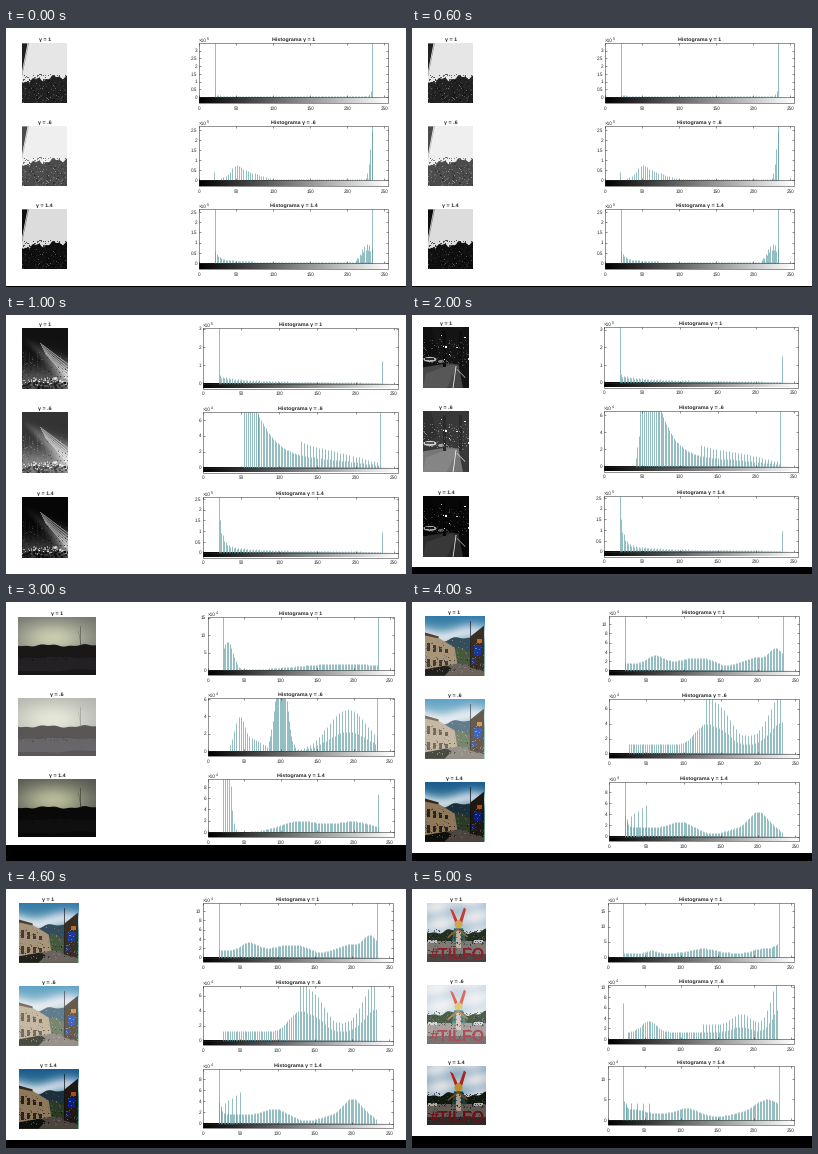
These frames come from a looping animation (400 px wide and 259 px high, 6000 ms). A matplotlib script:

```python
import numpy as np
import matplotlib.pyplot as plt
from matplotlib.animation import FuncAnimation
from matplotlib.collections import LineCollection
from matplotlib.patches import Ellipse, Polygon, Rectangle

W, H, DPI = 400, 259, 100
PX = 72 / DPI
TEAL, INK = "#5c9ca2", "#262626"
GAMMAS = ("1", ".6", "1.4")
DARK, BRIGHT = 21, 234  # bins that collect the clipped tones

plt.rcParams["font.family"] = "Liberation Sans"
plt.rcParams["text.hinting"] = "none"
fig = plt.figure(figsize=(W / DPI, H / DPI), dpi=DPI, facecolor="white")
ax = fig.add_axes([0, 0, 1, 1])


def label(x, y, s, size, ha="center", color=INK, **kw):
    return ax.text(x, y + 0.36 * size, s, fontsize=size * PX, ha=ha,
                   va="baseline", color=color, **kw)


def segments(segs, color, width, **kw):
    ax.add_collection(LineCollection(segs, colors=color, linewidths=width * PX, **kw))


def bump(v, center, height, width):
    return height * np.exp(-((v - center) / width) ** 2)


def tail(v, height, length, start=DARK):
    return height * np.exp((start - v) / length)


class Photo:
    """Flat scene in local pixels, with a gamma curve on every colour."""

    def __init__(self, x, y, w, h, gamma):
        self.x, self.y, self.w, self.h, self.g = x, y, w, h, gamma
        self.frame = Rectangle((x, y), w, h, transform=ax.transData)
        self.rng = np.random.default_rng(7)

    def tone(self, c):
        c = (c,) * 3 if np.isscalar(c) else c
        return tuple(float(v) ** self.g for v in c)

    def add(self, patch):
        ax.add_patch(patch)
        patch.set_clip_path(self.frame)

    def poly(self, c, *pts):
        self.add(Polygon(np.add(pts, (self.x, self.y)), fc=self.tone(c), lw=0))

    def box(self, c, x, y, w, h):
        self.poly(c, (x, y), (x + w, y), (x + w, y + h), (x, y + h))

    def blob(self, c, x, y, w, h, alpha=1):
        self.add(Ellipse((self.x + x, self.y + y), w, h, fc=self.tone(c), lw=0,
                         alpha=alpha))

    def line(self, c, x0, y0, x1, y1, width=1, alpha=1):
        art, = ax.plot([self.x + x0, self.x + x1], [self.y + y0, self.y + y1],
                       color=self.tone(c), lw=width * PX, alpha=alpha)
        art.set_clip_path(self.frame)

    def ridge(self, c, y, amp, waves, slope=0):
        """Fill everything below a wavy outline."""
        x = np.linspace(0, self.w, 60)
        t = 2 * np.pi * waves * x / self.w
        top = y + slope * x + amp * (np.sin(t) + 0.5 * np.sin(2.7 * t + 1))
        self.poly(c, (0, self.h), *zip(x, top), (self.w, self.h))

    def fade(self, fn):
        v, u = np.mgrid[0:1:50j, 0:1:50j]
        rgb = np.clip(np.stack(np.broadcast_arrays(*fn(u, v)), -1), 0, 1) ** self.g
        ax.imshow(rgb, extent=(self.x, self.x + self.w, self.y + self.h, self.y),
                  aspect="auto", interpolation="bilinear", zorder=0.5)

    def grain(self, lo, hi, n, top, bottom, left=0, size=1.1, alpha=0.7):
        pts = self.rng.uniform((left, top), (self.w, bottom), (n, 2))
        cols = [self.tone(c) for c in self.rng.uniform(lo, hi, n)]
        art = ax.scatter(*(pts + (self.x, self.y)).T, s=(size * PX) ** 2, c=cols,
                         marker="s", lw=0, alpha=alpha, zorder=1.5)
        art.set_clip_path(self.frame)


class Hist:
    """Histogram axes with a grey ramp below; heights are in pixels."""

    def __init__(self, x0, unit, top, base, bottom, gamma, ymax, step, power):
        self.x0, self.unit, self.top, self.base = x0, unit, top, base
        x1 = x0 + 255 * unit
        ax.imshow(np.linspace(0, 1, 256)[None], cmap="gray", aspect="auto",
                  extent=(x0, x1, bottom, base + 0.6), zorder=1)
        edges = [[(x0, top), (x1, top), (x1, bottom), (x0, bottom), (x0, top)],
                 [(x0, base), (x1, base)]]
        for v in range(0, 251, 50):
            x = x0 + v * unit
            edges += [[(x, top), (x, top + 1.7)], [(x, base), (x, base - 1.7)]]
            label(x, bottom + 4.8, str(v), 4.6)
        for v in np.arange(0, ymax, step):
            y = base - v / ymax * (base - top)
            edges += [[(x0, y), (x0 + 1.8, y)], [(x1, y), (x1 - 1.8, y)]]
            label(x0 - 2, y, f"{v:g}", 4.6, "right")
        segments(edges, INK, 0.5, zorder=3)
        label(x0, top - 2.6, "×10", 4.6, "left")
        label(x0 + 8, top - 4.4, str(power), 3.6, "left")
        label((x0 + x1) / 2, top - 3.8, f"Histograma γ = {gamma}", 5.4, weight="bold")

    def bars(self, fn, lo=DARK + 1, hi=BRIGHT, step=2, comb=1):
        """One stem every few bins; comb raises every second one."""
        v = np.arange(lo, hi, step)
        h = fn(v) * np.where(np.arange(len(v)) % 2, 1, comb)
        x = self.x0 + v * self.unit
        tops = np.maximum(self.base - h, self.top)
        segments([[(a, self.base), (a, b)] for a, b in zip(x, tops)], TEAL, 0.65, zorder=2)

    def spike(self, v, h=99):
        self.bars(lambda u: h + 0 * u, v, v + 1)

    def walls(self):
        self.spike(DARK)
        self.spike(BRIGHT)


def layout(photo, x0, unit, tops, plot_h, scales, powers, scene,
           gammas=(1, 0.6, 1.4), floor=H):
    x, w, h = photo
    plots = []
    for i, top in enumerate(tops):
        scene(Photo(x, top + 0.4, w, h, gammas[i]))
        label(x + w / 2, top - 3.8, f"γ = {GAMMAS[i]}", 5.4, weight="bold")
        plots.append(Hist(x0, unit, top, top + plot_h, top + h, GAMMAS[i],
                          *scales[i], powers[i]))
    ax.add_patch(Rectangle((0, floor), W, H - floor, fc="black", lw=0, zorder=5))
    return plots


# --- scenes ---------------------------------------------------------------

def tree_scene(p):
    p.box(0.9, 0, 0, p.w, p.h)
    p.poly(0.13, (0, 0), (5.5, 0), (0, 28))
    p.line(0.5, 6.5, 0, 0, 32, 0.5)
    p.ridge(0.13, 38, 1.8, 2.5, -0.12)
    p.grain(0.1, 0.25, 40, 31, 37, 2)
    p.grain(0.03, 0.25, 160, 36, 60, size=1.6)
    p.grain(0.25, 0.6, 60, 39, 60, size=0.9)


def streak_scene(p):
    def glow(u, v):
        beam = np.exp(-((v - 0.15 - 0.62 * u) / (0.04 + 0.16 * u)) ** 2)
        low = np.exp(-((v - 0.9) / 0.25) ** 2)
        return (0.07 + 0.5 * beam * u ** 1.2 + 0.28 * low,) * 3
    p.fade(glow)
    for i in range(6):
        p.line(0.95, 18 + i, 15 + 2 * i, p.w, 36 + 3 * i, 0.8, 0.6)
        p.line(0.35, 3 + 4 * i, 22 + i % 3 * 4, 1 + 5 * i, 52, 0.4, 0.5)
    p.grain(0.05, 0.45, 130, 24, 54)
    p.grain(0.65, 1, 80, 49, 57, size=1.5)
    p.grain(0.03, 0.3, 90, 54, 61, size=2)


def street_scene(p):
    p.box(0.08, 0, 0, p.w, p.h)
    p.grain(0.12, 0.5, 120, 12, 37)
    p.poly(0.28, (0, 40), (24, 36), (p.w, 38), (p.w, p.h), (0, p.h))
    p.poly(0.34, (3, 46), (28, 37), (34, 39), (24, p.h), (0, p.h))
    p.poly(0.06, (0, 0), (8, 0), (14, 25), (0, 34))
    for x in (20, 36):
        p.box(0.05, x, 4, 2.5, 36)
    p.poly(0.08, (36, 40), (p.w, 36), (p.w, p.h), (40, p.h))
    p.blob(0.75, 7, 32, 13, 5)
    p.box(0.15, 2, 31, 9, 1.6)
    p.blob(0.5, 18, 34, 6, 3)
    p.grain(0.85, 1, 9, 5, 33, 14, 1.6, 1)
    p.line(0.95, 33, 39, 30, 61, 0.8)
    p.line(0.75, 34, 42, 42, 50, 0.7)


def dusk_scene(p):
    def sky(u, v):
        glow = np.exp(-((u - 0.45) / 0.5) ** 2 - ((v - 0.36) / 0.32) ** 2)
        return 0.43 + 0.36 * glow, 0.44 + 0.36 * glow, 0.42 + 0.27 * glow
    p.fade(sky)
    p.ridge((0.1, 0.09, 0.09), 28, 0.9, 2)
    p.ridge((0.14, 0.13, 0.14), 40, 0.5, 1.5)
    p.ridge((0.1, 0.09, 0.1), 53, 1, 0.8)
    p.grain(0.04, 0.13, 60, 38, 43, alpha=0.5)
    p.line(0.25, 62, 9, 62, 28, 0.6, 0.8)
    p.line(0.3, 60.5, 14, 63, 28, 0.5, 0.6)


def town_scene(p):
    def sky(u, v):
        cloud = np.exp(-((v - 0.3 - 0.05 * np.sin(6 * u)) / 0.14) ** 2)
        return 0.2 + 0.4 * v + 0.5 * cloud, 0.48 + 0.3 * v + 0.3 * cloud, 0.66 + 0.25 * cloud
    p.fade(sky)
    p.ridge((0.2, 0.3, 0.36), 23, 2, 1.2)
    p.ridge((0.28, 0.35, 0.24), 33, 2, 1.5)
    p.poly((0.66, 0.58, 0.47), (0, 18), (13, 21), (30, 31), (33, 49), (0, 55))
    p.poly((0.3, 0.25, 0.2), (0, 16), (14, 20), (14, 22), (0, 19))
    for i in range(4):
        for y, drop in ((27, 1.7), (43, 0.4)):
            p.box((0.27, 0.23, 0.19), 2.5 + 6 * i, y + drop * i, 2.5, 7.5 - i)
    p.poly((0.42, 0.39, 0.36), (0, 54), (33, 47), (p.w, 50), (p.w, p.h), (0, p.h))
    p.poly((0.12, 0.13, 0.1), (0, 53), (22, 49), (27, 52), (20, p.h), (0, p.h))
    p.poly((0.22, 0.18, 0.14), (46, 20), (p.w, 9), (p.w, 55), (45, 51))
    p.box((0.1, 0.22, 0.6), 49, 29, 7, 10)
    p.box((0.12, 0.2, 0.5), 47, 42, 4, 6)
    p.box((0.75, 0.42, 0.18), 52, 23, 5, 4)
    p.line(0.12, 45, 5, 45, 50, 0.7)
    p.grain(0.08, 0.6, 110, 40, 56)
    p.grain(0.2, 0.7, 50, 24, 40)


def plaza_scene(p):
    def sky(u, v):
        cloud = 0.5 + 0.5 * np.sin(7 * u + 9 * v) * np.cos(11 * v - 3 * u)
        return 0.68 + 0.22 * cloud, 0.77 + 0.14 * cloud, 0.84 + 0.08 * cloud
    p.fade(sky)
    p.ridge((0.13, 0.19, 0.12), 28, 2, 1.7)
    p.grain(0.05, 0.4, 140, 26, 41)
    p.box((0.5, 0.48, 0.46), 0, 38, p.w, 21)
    for x in (1, 47):
        p.box(0.75, x, 36.5, 9, 3)
    # painted figure
    p.poly((0.8, 0.22, 0.17), (28, 19), (23, 5), (26, 7), (31, 18))
    p.poly((0.75, 0.25, 0.2), (32, 18), (37, 4), (39, 6), (35, 20))
    p.blob((0.8, 0.66, 0.3), 31.5, 21, 8, 8)
    p.poly((0.15, 0.4, 0.36), (27, 25), (36, 25), (39, 38), (25, 38))
    p.box((0.75, 0.7, 0.65), 29, 27, 5, 18)
    for x in (22, 40):
        p.line((0.6, 0.4, 0.2), 31, 26, x, 33, 1.6)
    p.box((0.3, 0.27, 0.26), 0, 51, p.w, 8)
    p.grain(0.1, 0.5, 90, 40, 59)
    art = label(p.x + p.w / 2 + 1, p.y + 49.3, "#TILFO", 16, weight="bold",
                color=p.tone((0.55, 0.13, 0.17)))
    art.set_clip_path(p.frame)


# --- slides ---------------------------------------------------------------

def trees():
    a, b, c = layout((16, 45.3, 60), 193, 0.741, (15, 98, 181), 54,
                     ((3.5, 0.5), (2.7, 0.5), (2.65, 0.5)), (5, 5, 5), tree_scene,
                     floor=258)
    a.walls()
    a.bars(lambda v: 0.5 + tail(v, 1.2, 40) + bump(v, 235, 10, 4))
    b.spike(20, 8)
    b.bars(lambda v: 0.6 + bump(v, 50, 8, 9) + bump(v, 62, 8, 25), 30, step=3)
    b.bars(lambda v: bump(v, 236, 62, 6), 225)
    b.spike(BRIGHT - 1)
    c.walls()
    c.bars(lambda v: 0.6 + tail(v, 10, 4) + tail(v, 4, 35))
    c.bars(lambda v: bump(v, 227, 19, 12), 212, step=1.6, comb=0.7)


def night(plots, start, edge, length, spike):
    """Dark pictures: steep decay, plus a lone bright spike."""
    a, b, c = plots
    for p, steep, end in ((a, 2, spike), (c, 26, 20.5)):
        p.spike(DARK)
        p.bars(lambda v: 0.6 + tail(v, steep, 5) + tail(v, 4.5, 60), comb=1.25)
        p.spike(BRIGHT, end)

    def decay(v):
        return tail(v, 53, length, edge) + bump(v, 165, 6, 65)
    b.bars(decay, start, edge, 2.5)
    b.bars(decay, edge, 128)
    b.bars(decay, 128, 232, 2, 2.1)
    b.spike(BRIGHT - 2)


def streaks():
    plots = layout((16.4, 45.8, 60.5), 197, 0.763, (13, 97, 182), 55.5,
                   ((3.03, 1), (7, 2), (2.6, 0.5)), (5, 4, 5), streak_scene)
    night(plots, 54, 72, 30, 23)


def street():
    plots = layout((11, 46, 60.5), 192, 0.76, (12, 96, 181), 55.5,
                   ((3.15, 1), (6.5, 2), (2.6, 0.5)), (5, 4, 5), street_scene, floor=252)
    plots[1].bars(lambda v: 5.5 * (v - 40), 41.5, 46)
    night(plots, 48, 76, 24, 26.5)


def dusk():
    a, b, c = layout((12, 78, 58), 202, 0.728, (15, 96, 177), 53,
                     ((15.2, 5), (6.1, 2), (9.4, 2)), (4, 4, 4), dusk_scene,
                     (1, 0.45, 1.4), 243)
    a.walls()
    a.bars(lambda v: bump(v, 27, 28, 10) + bump(v, 185, 6.5, 85))
    b.bars(lambda v: bump(v, 43, 30, 10) + bump(v, 62, 11, 20), 30, 84, 3)
    b.bars(lambda v: bump(v, 100, 85, 11), 84, 120, 1.6)
    b.bars(lambda v: bump(v, 192, 19, 38), 120, comb=2.2)
    b.spike(BRIGHT - 2)
    c.bars(lambda v: bump(v, 24, 110, 7.5), DARK, 45, 2.5)
    c.bars(lambda v: bump(v, 125, 11, 38) + bump(v, 200, 10.5, 40), 45)
    c.spike(BRIGHT, 38)


def town():
    a, b, c = layout((12.6, 59.7, 59.3), 197, 0.745, (14, 97, 180), 54.5,
                     ((11.7, 2), (7.3, 2), (9.9, 2)), (4, 4, 4), town_scene, floor=251)
    a.walls()
    a.bars(lambda v: 7 + bump(v, 62, 8, 16) + bump(v, 118, 6, 30) - bump(v, 155, 3, 12)
           + bump(v, 196, 6, 18) + bump(v, 224, 15, 13))

    def light(v):
        return 9 + bump(v, 130, 20, 20) + bump(v, 155, 9, 15) + bump(v, 232, 22, 22)
    b.bars(light, 27, 130, 2.4)
    b.bars(light, 130, comb=1.9)
    c.spike(DARK)
    c.bars(lambda v: 9 + tail(v, 17, 3) + bump(v, 95, 6, 20) - bump(v, 140, 6, 22)
           + bump(v, 200, 16, 17) - bump(v, 245, 9, 16))
    c.bars(lambda v: 16 + 0.55 * (v - DARK), 24, 53, 5)


def plaza():
    a, b, c = layout((15, 59, 59), 196, 0.73, (14, 96, 177), 53.8,
                     ((17.8, 5), (10.4, 2), (13.2, 5)), (4, 4, 4), plaza_scene, floor=247)
    a.walls()
    a.bars(lambda v: 4 + bump(v, 60, 2.7, 9) + bump(v, 130, 4.5, 22)
           + bump(v, 208, 4, 14) + bump(v, 238, 10, 16))

    def light(v):
        return 7 + bump(v, 56, 11, 14) + bump(v, 182, 5, 16) + bump(v, 236, 23, 16)
    b.spike(DARK, 36)
    b.bars(light, 27, 130, 2.4)
    b.bars(light, 130, comb=2.1)
    c.walls()
    c.bars(lambda v: 7 + tail(v, 14, 3) + bump(v, 35, 4, 15) + bump(v, 108, 5, 16)
           - bump(v, 150, 3.5, 20) + bump(v, 218, 13.5, 24))
    c.bars(lambda v: 17 + 0 * v, 24, 64, 8)


SLIDES = (trees, streaks, street, dusk, town, plaza)


def draw(i):
    ax.clear()
    SLIDES[i]()
    ax.set_xlim(0, W)
    ax.set_ylim(H, 0)
    ax.axis("off")
    return []


anim = FuncAnimation(fig, draw, frames=len(SLIDES), init_func=lambda: [],
                     interval=1000, repeat=True, repeat_delay=0)
plt.show()
```
